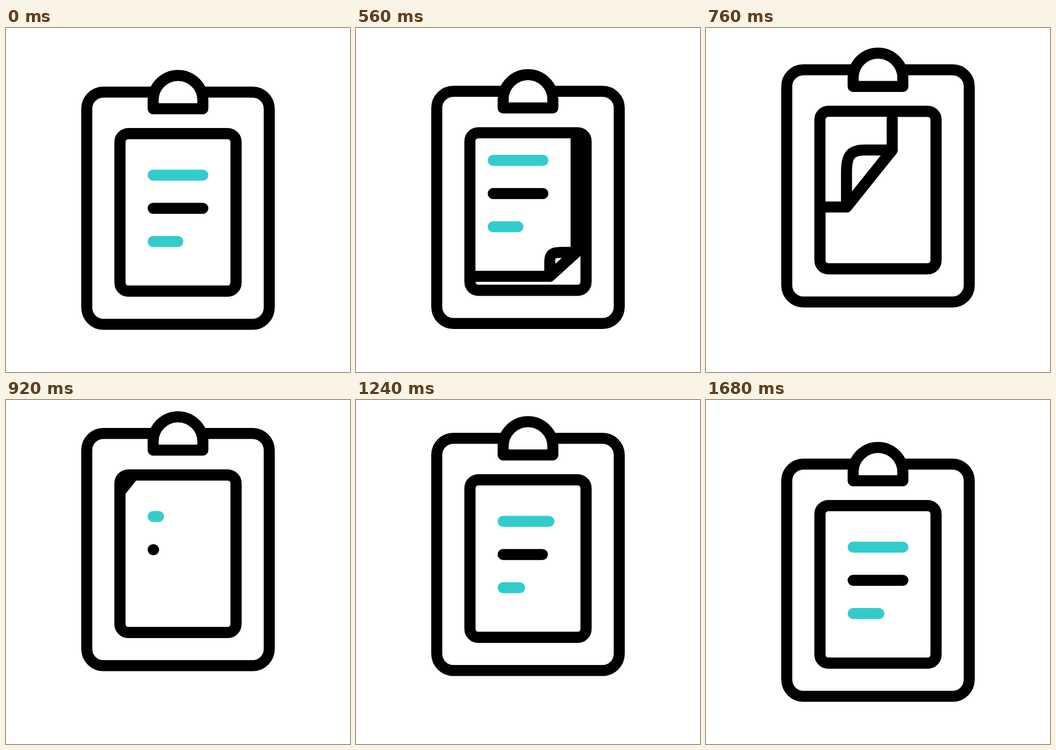
Recreate the animation shown at these times as an HTML page. Size 640 by 640 pixels, loop 2 s.

```html
<!DOCTYPE html>
<html lang="en">
<head>
<meta charset="utf-8">
<title>Clipboard</title>
<style>
  html, body { margin: 0; height: 100%; overflow: hidden; background: #fff; }
  svg { display: block; width: 100vw; height: 100vh; }
  svg * { stroke-width: 20.5; stroke-linecap: round; stroke-linejoin: round; }
  .ink { fill: #fff; stroke: #000; }
  .bar { fill: none; stroke: #000; }
  .teal { stroke: #3cc; }
</style>
</head>
<body>
<svg viewBox="0 0 640 640">
  <clipPath id="page"><rect x="212" y="196.5" width="216" height="293" rx="15.5"/></clipPath>
  <g id="board">
    <rect class="ink" x="150.25" y="119.25" width="339.5" height="432" rx="31"/>
    <path class="ink" d="M273.75 150.25V134.5a46.25 46.25 0 0 1 92.5 0V150.25Z"/>
    <rect class="ink" x="212" y="196.5" width="216" height="293" rx="15.5"/>
    <g id="next"></g>
    <g clip-path="url(#page)">
      <g id="sheet">
        <path id="paper" class="ink"/>
        <path id="curl" class="ink"/>
        <g id="lines"></g>
      </g>
    </g>
    <rect class="ink" style="fill:none" x="212" y="196.5" width="216" height="293" rx="15.5"/>
  </g>
</svg>
<script>
const LOOP = 2000, STEP = 40, PEEL = 400;
const $ = id => document.getElementById(id);
const clamp = u => Math.min(1, Math.max(0, u));

// Cubic Bezier easing with handles (x1, 0) and (x2, 1)
function ease(u, x1 = 1 / 3, x2 = 1 / 3) {
  u = clamp(u);
  let lo = 0, hi = 1;
  for (let i = 0; i < 24; i++) {
    const s = (lo + hi) / 2, r = 1 - s;
    if (3 * s * r * r * x1 + 3 * s * s * r * x2 + s ** 3 < u) lo = s; else hi = s;
  }
  return lo * lo * (3 - 2 * lo);
}

function makeBars(group) {
  return [0, 1, 2].map(i => {
    const bar = document.createElementNS('http://www.w3.org/2000/svg', 'path');
    bar.setAttribute('class', i === 1 ? 'bar' : 'bar teal');
    group.append(bar);
    return bar;
  });
}

function setBar(bar, i, length) {
  bar.setAttribute('d', length > 0 ? `M273.75 ${273.7 + i * 61.8}h${length}` : '');
}

const oldBars = makeBars($('lines')), newBars = makeBars($('next'));
const growth = [
  { start: 818, time: 595, length: 92.5 },
  { start: 886, time: 635, length: 92.5 },
  { start: 948, time: 645, length: 47.8 }
];

function drawSheet(t) {
  const age = Math.max(0, t - PEEL);
  const dx = 18.5 * (age / 160) ** 1.83, dy = 1.41 * dx;
  const u = clamp(age / 360), w = 85 * u ** 0.68, h = 106 * u ** 1.07;
  const right = 428, bottom = 489.5, x = right - w, y = bottom - h;

  $('sheet').setAttribute('transform', `translate(${-dx} ${-dy})`);
  $('sheet').style.display = t < 1000 ? '' : 'none';
  $('paper').style.display = $('curl').style.display = age ? '' : 'none';
  $('paper').setAttribute('d', `M150 100H${right}V${y}L${x} ${bottom}H150Z`);
  $('curl').setAttribute('d', `M${x} ${bottom}V${y + h * 0.38}` +
    `C${x} ${y + h * 0.09} ${x + w * 0.1} ${y} ${x + w * 0.4} ${y}H${right}Z`);

  const left = 1 - clamp((t - 600) / 140);
  oldBars.forEach((bar, i) => setBar(bar, i, [92.5, 92.5, 46][i] * left));
}

function draw(now) {
  const t = Math.floor(now % LOOP / STEP) * STEP;
  const lift = ease((t - 520) / 500, 0.307, 0.322) - ease((t - 1120) / 500, 0.396, 0.285);
  $('board').setAttribute('transform', `translate(0 ${-59 * lift})`);
  drawSheet(t);
  growth.forEach((g, i) => setBar(newBars[i], i, g.length * ease((t - g.start) / g.time)));
}

const begin = performance.now();
function tick() {
  draw(performance.now() - begin);
  requestAnimationFrame(tick);
}
tick();
</script>
</body>
</html>
```
